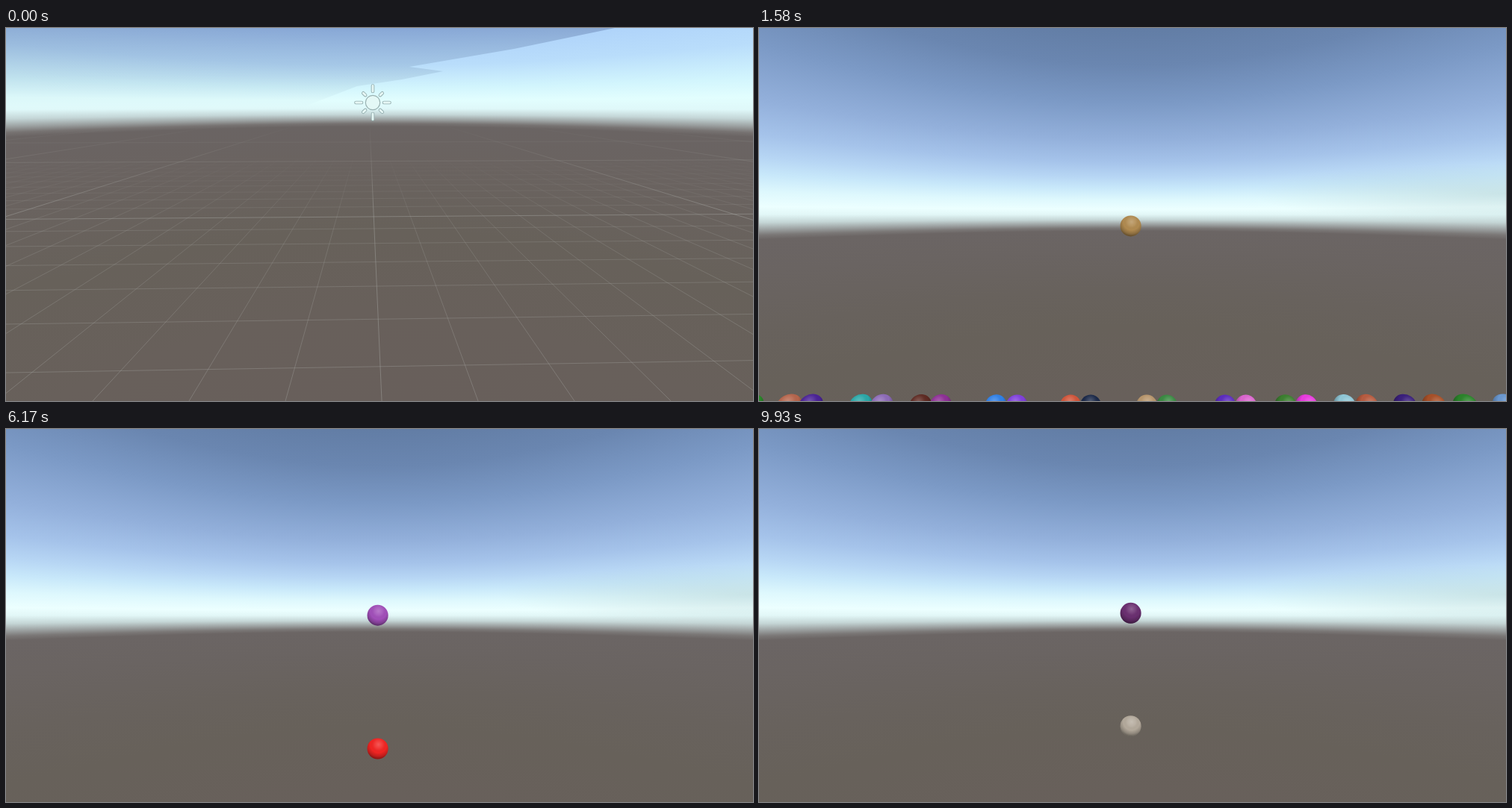
Animation of 1000 by 500 pixels, one loop 9.99 s. Source, as an HTML page with a canvas:

```html
<!DOCTYPE html>
<html lang="en">
<head>
<meta charset="utf-8">
<title>Falling spheres</title>
<style>
  html, body { margin: 0; width: 100%; height: 100%; overflow: hidden; background: #68615c; }
  canvas { display: block; width: 1000px; height: 500px; }
</style>
</head>
<body>
<canvas id="stage" width="1000" height="500"></canvas>
<script>
const W = 1000, H = 500, FOCAL = 433, LOOP = 9990;
const ctx = document.getElementById('stage').getContext('2d');

function layer(paint) {
  const canvas = document.createElement('canvas');
  canvas.width = W;
  canvas.height = H;
  paint(canvas.getContext('2d'));
  return canvas;
}

function verticalFade(c, y0, y1, stops) {
  const g = c.createLinearGradient(0, y0, 0, y1);
  for (const [at, color] of stops) g.addColorStop(at, color);
  return g;
}

// Paints colours of constant elevation; stops give the y at the middle column.
function paintSky(c, eyeY, stops) {
  const top = -eyeY, bottom = H - eyeY;
  const fill = verticalFade(c, top, bottom, stops.map(([y, color]) => [y / H, color]));
  c.fillStyle = fill;
  for (let x = 0; x < W; x++) {
    const stretch = Math.hypot(1, (x - W / 2) / FOCAL);
    c.setTransform(1, 0, 0, stretch, x, eyeY);
    c.fillRect(0, top, 1, bottom - top);
  }
  c.resetTransform();
}

function line(c, x0, y0, x1, y1) {
  c.beginPath();
  c.moveTo(x0, y0);
  c.lineTo(x1, y1);
  c.stroke();
}

function paintGrid(c) {
  const horizon = 100;
  const fade = (start, a, b) => verticalFade(c, start, H, [
    [0, 'rgba(160,160,156,0)'], [.3, `rgba(160,160,156,${a})`], [1, `rgba(160,160,156,${b})`]]);
  const minor = fade(170, .25, .42), major = fade(130, .5, .5);
  c.lineWidth = 1;
  for (let i = -40; i <= 40; i++) {
    c.strokeStyle = i % 10 ? minor : major;
    const xAt = y => 485.6 + (y - horizon) * (.0436 + .3225 * i);
    line(c, xAt(132), 132, xAt(H), H);
  }
  for (let k = 0; k <= 26; k++) {
    c.strokeStyle = k % 10 === 6 ? major : minor;
    const depth = 1 / (.002825 + .000619 * k);
    const yAt = x => horizon + depth * (1 - (x - 490) * .0000465);
    line(c, 0, yAt(0), W, yAt(W));
  }
}

function paintSunIcon(c) {
  c.save();
  c.translate(491, 100);
  c.lineCap = 'round';
  for (const [color, width] of [['#93adae', 4.6], ['#e6f7f5', 2.8]]) {
    c.strokeStyle = color;
    for (let i = 0; i < 8; i++) {
      c.lineWidth = width;
      line(c, 0, i % 2 ? -14 : -15, 0, i % 2 ? -18 : -22.5);
      c.rotate(Math.PI / 4);
    }
  }
  c.beginPath();
  c.arc(0, 0, 9.7, 0, 7);
  c.fillStyle = '#e4f8f6';
  c.fill();
  c.lineWidth = 1.2;
  c.strokeStyle = '#9ab2b2';
  c.stroke();
  c.restore();
}

const editorView = layer(c => {
  paintSky(c, 105, [
    [0, '#a9cdf9'], [50, '#b9ddfb'], [80, '#d2f5fd'], [97, '#e2fefe'], [108, '#dff8f9'],
    [116, '#c4d6d7'], [123, '#9a9f9f'], [128, '#777372'], [132, '#6a6463'],
    [180, '#6a6360'], [270, '#67615a'], [380, '#68605b'], [500, '#685f5b']]);
  // Darker haze across the left part of the sky
  c.fillStyle = verticalFade(c, 0, 105, [[0, 'rgba(85,110,160,.4)'], [.6, 'rgba(110,140,170,.2)'], [1, 'rgba(120,150,170,0)']]);
  c.beginPath();
  for (const [x, y] of [[0, 0], [815, 0], [680, 28], [540, 52], [585, 58], [530, 69], [470, 78], [400, 105], [0, 105]]) c.lineTo(x, y);
  c.fill();
  paintGrid(c);
  paintSunIcon(c);
});

const gameView = layer(c => {
  paintSky(c, 250, [
    [0, '#627da5'], [50, '#6a86b0'], [100, '#7b99c5'], [150, '#93b0db'], [180, '#a5c3ea'],
    [200, '#b7d6f4'], [215, '#c8e8fa'], [230, '#def8fd'], [243, '#ecffff'], [250, '#e2f7f7'],
    [257, '#c5d6d6'], [264, '#979b9b'], [268, '#7b7877'], [272, '#6b6564'],
    [300, '#6a6462'], [350, '#68625d'], [400, '#67615a'], [500, '#68605b']]);
  const shade = c.createRadialGradient(0, 0, 0, 0, 0, 1);
  shade.addColorStop(0, 'rgba(150,180,180,.3)');
  shade.addColorStop(1, 'rgba(150,180,180,0)');
  c.setTransform(340, 0, 0, 40, 1000, 222);
  c.fillStyle = shade;
  c.fillRect(-1, -1, 2, 2);
});

const RADIUS = 14, START_Y = 246.5, FALL = 137.3;
const row = [
  [-12, '#2a8a2a'], [40, '#b5654c'], [69, '#4a2296'], [136, '#2aa8a8'], [164, '#8d6bb8'],
  [216, '#5e2a22'], [243, '#8e2f96'], [317, '#2f80e8'], [345, '#8040dc'], [417, '#d0553a'],
  [444, '#1a2848'], [519, '#b8966c'], [546, '#3a8a42'], [624, '#5c2cc0'], [652, '#dc66d0'],
  [705, '#3c8030'], [733, '#ea3ce0'], [784, '#90c8d8'], [814, '#b85c40'], [865, '#3a1f7c'],
  [904, '#a85028'], [946, '#2a842a'], [1000, '#6a98d0']];
const drops = ['#b08a50', '#25d86c', '#a02d3c', '#34502b', '#f02422',
  '#a14fb9', '#8a9a70', '#1f8fea', '#b3a99b', '#6a2f70'];

const shading = ctx.createRadialGradient(.08, -.4, 0, .08, -.4, 1.42);
[[0, 'rgba(255,255,255,.24)'], [.3, 'rgba(255,255,255,.08)'], [.55, 'rgba(0,0,0,0)'],
  [.8, 'rgba(0,0,0,.2)'], [1, 'rgba(0,0,0,.48)']].forEach(s => shading.addColorStop(...s));

function ball(x, y, color) {
  const dx = x - W / 2;
  const tilt = Math.abs(dx) > 20 ? Math.atan((y - 250) / dx) * Math.min(1, Math.abs(dx) / 300) : 0;
  ctx.save();
  ctx.translate(x, y);
  ctx.rotate(tilt);
  ctx.scale(RADIUS * (1 + .28 * (dx / 450) ** 2), RADIUS);
  ctx.beginPath();
  ctx.arc(0, 0, 1, 0, 7);
  for (const fill of [color, shading]) {
    ctx.fillStyle = fill;
    ctx.fill();
  }
  ctx.restore();
}

const fallY = age => START_Y + FALL * age * age;

function draw(ms) {
  ctx.drawImage(ms < 110 ? editorView : gameView, 0, 0);
  if (ms < 360) return;
  // The picture advances in discrete steps; one sphere is dropped per second of world time.
  const step = Math.floor((ms - 360) / 60.57 + .15);
  const world = .113 + .0629 * step;
  for (const [x, color] of row) ball(x, fallY(world) + 1, color);
  drops.forEach((color, i) => {
    const age = world - i - 1;
    if (age >= 0) ball(497.6, fallY(age), color);
  });
}

const begin = performance.now();
function tick() {
  draw((performance.now() - begin) % LOOP);
  requestAnimationFrame(tick);
}
tick();
</script>
</body>
</html>
```
